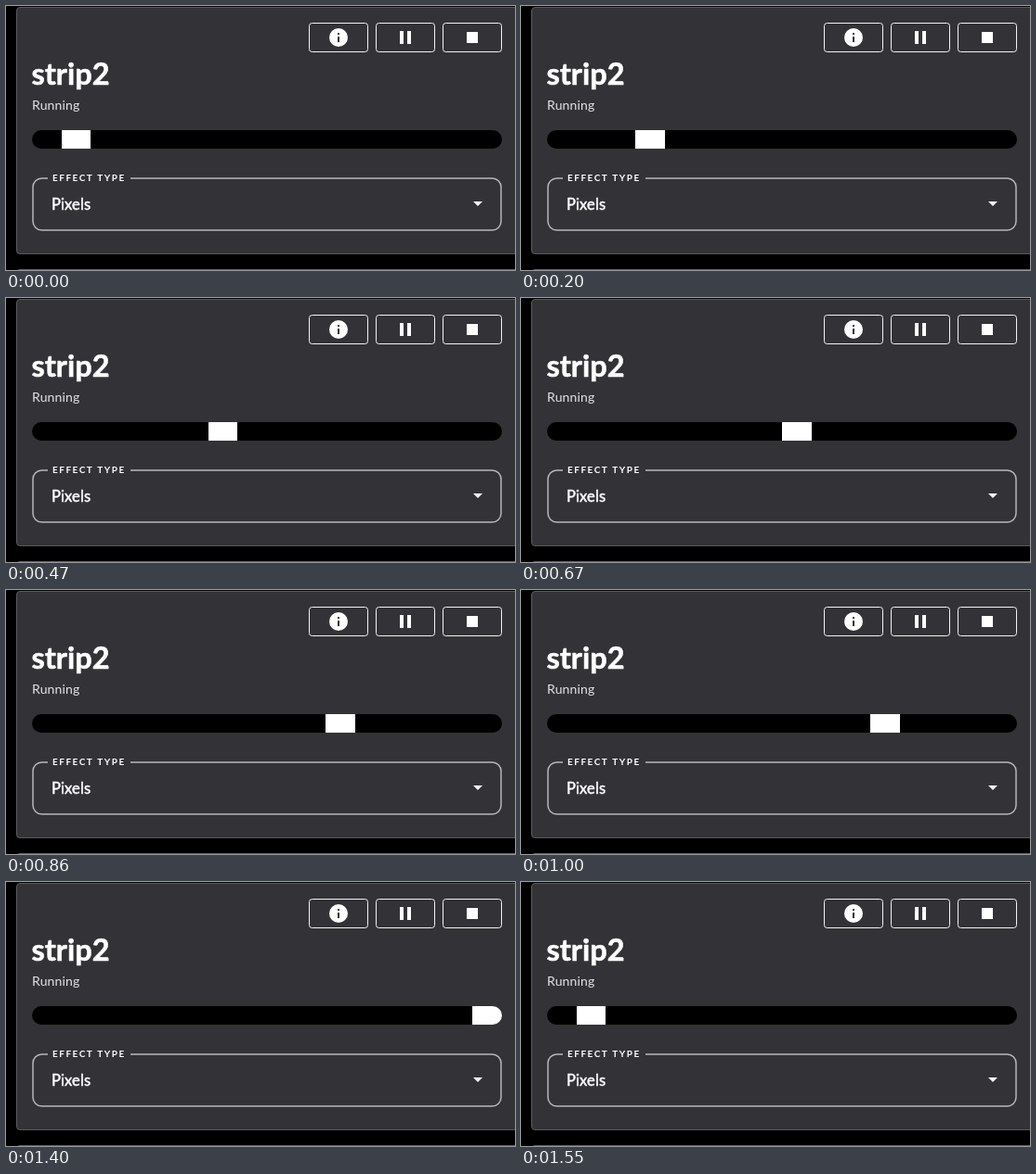
Animation, 548 px wide and 285 px high, one loop 1.68 s. Source, as an HTML page with a canvas:

```html
<!DOCTYPE html>
<html lang="en">
<head>
<meta charset="utf-8">
<title>Strip preview</title>
<style>
  html, body { margin: 0; width: 100%; height: 100%; overflow: hidden; background: #000; }
  canvas { display: block; }
</style>
</head>
<body>
<canvas id="stage" width="548" height="285"></canvas>
<script>
const ctx = document.getElementById('stage').getContext('2d');
const CARD = '#333337';
const EDGE = '#5b5b5e';
const FONT = 'Lato, "Open Sans", sans-serif';
const LOOP = 1680;
const BAR = { x: 28, y: 134, w: 506, h: 20, cells: 16 };
// Times at which the lit cell moves one place to the right
const STEPS = [130, 200, 330, 400, 470, 600, 670, 800, 860,
               1000, 1070, 1200, 1270, 1400, 1480, 1550];

function roundBox(x, y, w, h, r, { fill, stroke, line = 1 }) {
  ctx.beginPath();
  ctx.roundRect(x, y, w, h, r);
  if (fill) { ctx.fillStyle = fill; ctx.fill(); }
  if (stroke) { ctx.strokeStyle = stroke; ctx.lineWidth = line; ctx.stroke(); }
}

function rect(x, y, w, h, color) {
  ctx.fillStyle = color;
  ctx.fillRect(x, y, w, h);
}

// extra thickens the strokes of the letters
function label(str, x, y, style, { color = '#fff', spacing = 0, extra = 0 } = {}) {
  ctx.font = `${style} ${FONT}`;
  ctx.letterSpacing = `${spacing}px`;
  ctx.fillStyle = ctx.strokeStyle = color;
  ctx.fillText(str, x, y);
  if (extra) {
    ctx.lineWidth = extra;
    ctx.lineJoin = 'round';
    ctx.strokeText(str, x, y);
  }
}

function drawButtons() {
  for (const x of [326, 398, 470]) roundBox(x + 0.5, 18.5, 63, 31, 3, { stroke: '#f4f4f4' });

  // info
  ctx.fillStyle = '#fff';
  ctx.beginPath();
  ctx.arc(358, 34, 10, 0, Math.PI * 2);
  ctx.fill();
  rect(357, 29, 2, 2, CARD);
  rect(357, 33, 2, 6, CARD);

  // pause
  rect(424, 27, 4, 14, '#fff');
  rect(432, 27, 4, 14, '#fff');

  // stop
  rect(496, 28, 12, 12, '#fff');
}

function drawBar(cell) {
  const edge = i => Math.round(BAR.x + BAR.w * i / BAR.cells);
  ctx.save();
  ctx.beginPath();
  ctx.roundRect(BAR.x, BAR.y, BAR.w, BAR.h, 10);
  ctx.clip();
  rect(BAR.x, BAR.y, BAR.w, BAR.h, '#000');
  rect(edge(cell), BAR.y, edge(cell + 1) - edge(cell), BAR.h, '#fff');
  ctx.restore();
}

function drawSelect() {
  roundBox(29, 186, 504, 56, 9.5, { stroke: '#b8b8ba', line: 1.5 });
  rect(45, 184, 89, 4, CARD);
  label('EFFECT TYPE', 50, 189, 'bold 10px', { spacing: 1.5 });
  label('Pixels', 49, 220, '16.5px', { spacing: 0.15, extra: 0.5 });
  ctx.fillStyle = '#fff';
  ctx.beginPath();
  ctx.moveTo(503, 211);
  ctx.lineTo(513, 211);
  ctx.lineTo(508, 216);
  ctx.fill();
}

function draw(t) {
  const cell = (1 + STEPS.filter(s => s <= t).length) % BAR.cells;
  rect(0, 0, 548, 285, '#000');
  roundBox(11.5, 1.5, 560, 266, 3.5, { fill: CARD, stroke: EDGE });
  roundBox(11.5, 284.5, 560, 60, 3.5, { fill: CARD, stroke: EDGE });
  drawButtons();
  label('strip2', 27.5, 85, 'bold 32.5px', { extra: 0.6 });
  label('Running', 28, 112, '14px', { color: '#e4e4e5', spacing: 0.15 });
  drawBar(cell);
  drawSelect();
}

const start = performance.now();
function tick() {
  draw((performance.now() - start) % LOOP);
  requestAnimationFrame(tick);
}
tick();
</script>
</body>
</html>
```
